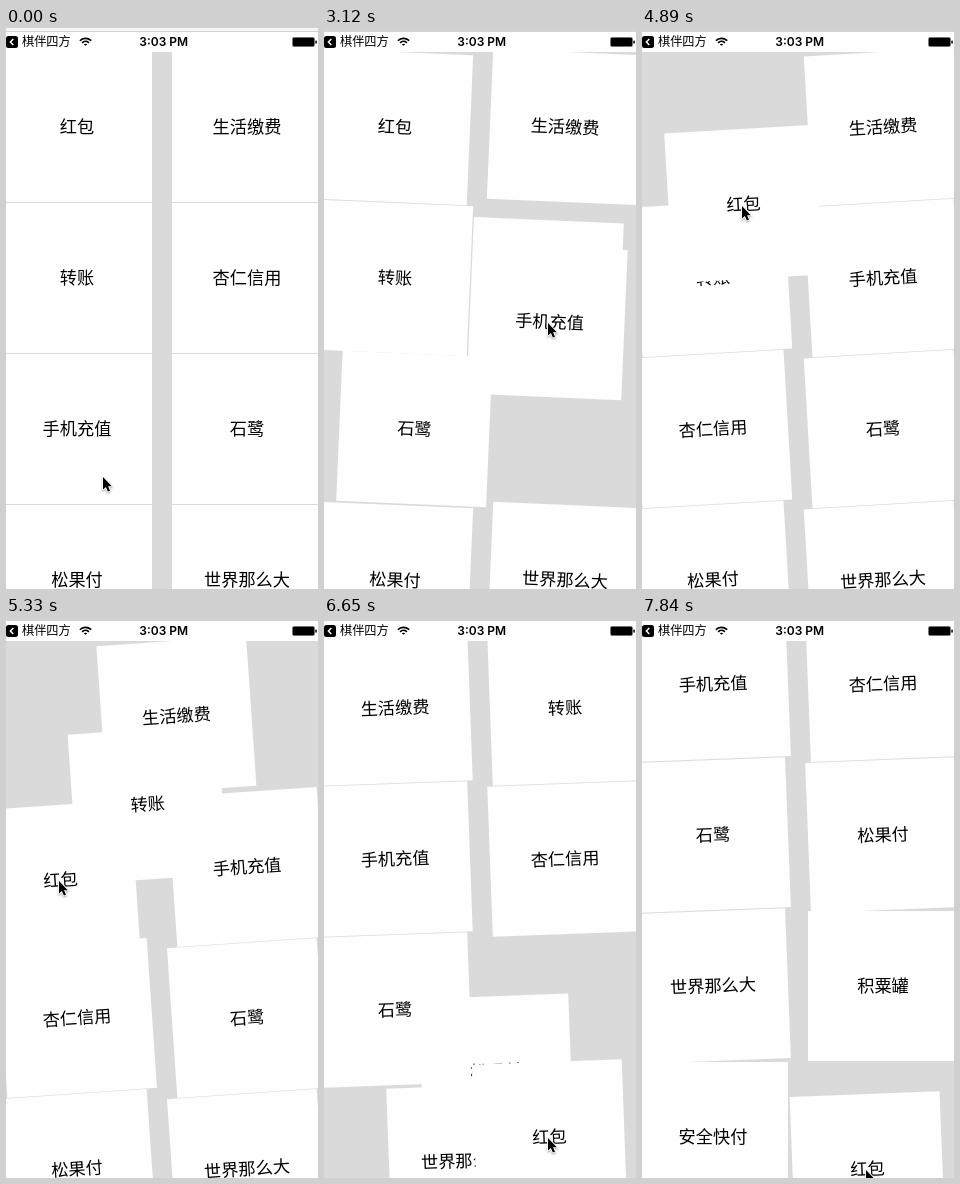
These frames come from a looping animation (312 px wide and 561 px high, 7990 ms). An HTML page with a canvas:

```html
<!DOCTYPE html>
<html lang="zh">
<head>
<meta charset="utf-8">
<title>可拖动网格</title>
<style>
html, body { margin: 0; width: 100%; height: 100%; overflow: hidden; background: #fff; }
canvas { display: block; }
</style>
</head>
<body>
<canvas id="stage" width="312" height="561"></canvas>
<script>
const W = 312, H = 561, LOOP = 7990, TICK = 148;
const WHITE = '#fefefe', GRAY = '#dadada';
const CJK = '"Noto Sans CJK SC", "Noto Sans CJK", "Noto Sans CJK JP", sans-serif';
const SIZE = 150, PITCH = 151, TOP = 24, VISIBLE = 8;
const SLIDE = 300, GRAB = 250, DROP = 220, WIGGLE = 226.5, TILT = 4 * Math.PI / 180;
const ctx = document.getElementById('stage').getContext('2d');

const labels = ['红包', '生活缴费', '转账', '杏仁信用', '手机充值', '石鹭',
  '松果付', '世界那么大', '积粟罐', '安全快付'];

// Each stop is a time and the slot the dragged cell takes over.
const drags = [
  { item: 4, start: 2067, end: 3550, stops: [[2700, 5], [3045, 3]] },
  { item: 0, start: 4648, end: LOOP + TICK, stops: [[5195, 2], [5640, 4], [6080, 5], [6491, 7], [7200, 9]] }
];

// Key points of the pointer: time, x, y.
const pointer = [
  [440, 96, 448], [1180, 79, 429], [2072, 79, 429], [2700, 165, 405], [3108, 223, 294],
  [3710, 213, 294], [3848, 136, 218], [4292, 115, 148], [4736, 115, 148], [5328, 52, 263],
  [6300, 200, 430], [6660, 223, 520], [6900, 223, 547], [7844, 223, 552]
];

const lerp = (a, b, p) => a + (b - a) * p;
const mix = (a, b, p) => a.map((v, i) => lerp(v, b[i], p));
const clamp = v => Math.max(0, Math.min(1, v));
const smooth = v => { const p = clamp(v); return p * p * (3 - 2 * p); };
const slotAt = i => [i % 2 ? 241 : 71, 99 + PITCH * (i >> 1)];

// Every cell remembers its slides from one slot to the next.
const slides = labels.map((_, i) => [{ t: -SLIDE, from: i, to: i }]);
const order = labels.map((_, i) => i);
for (const { item, stops } of drags) {
  for (const [t, slot] of stops) {
    const before = order.slice();
    order.splice(order.indexOf(item), 1);
    order.splice(slot, 0, item);
    order.forEach((id, i) => {
      const from = before.indexOf(id);
      if (from !== i) slides[id].push({ t, from, to: i });
    });
  }
}

function place(id, t) {
  const s = slides[id].filter(m => m.t <= t).pop();
  return mix(slotAt(s.from), slotAt(s.to), smooth((t - s.t) / SLIDE));
}

function pointerAt(t) {
  const i = Math.max(1, pointer.findIndex(k => k[0] > t));
  const [t0, ...a] = pointer[t < LOOP - TICK ? i - 1 : pointer.length - 2];
  const [t1, ...b] = pointer[t < LOOP - TICK ? i : pointer.length - 1];
  return mix(a, b, clamp((t - t0) / (t1 - t0)));
}

// The grabbed cell eases under the pointer and, when let go, into its slot.
function liftedAt(drag, t) {
  const [x, y] = pointerAt(t);
  const held = Math.min(smooth((t - drag.start) / GRAB), smooth((drag.end - t) / DROP));
  return mix(place(drag.item, t), [x + 2.5, y], held);
}

function wiggle(t) {
  const p = (t / WIGGLE) % 1;
  return TILT * (4 * Math.min(p, 1 - p) - 1);
}

function text(s, x, y, font, align = 'center') {
  ctx.font = font;
  ctx.textAlign = align;
  ctx.fillStyle = '#000';
  ctx.fillText(s, x, y);
}

function cell(id, [x, y], angle) {
  ctx.save();
  ctx.translate(x, y);
  ctx.rotate(angle);
  ctx.fillStyle = WHITE;
  ctx.fillRect(-SIZE / 2, -SIZE / 2, SIZE, SIZE);
  text(labels[id], 0, 6.1, '17.2px ' + CJK);
  ctx.restore();
}

function box(x, y, w, h, r, color = '#000') {
  ctx.beginPath();
  ctx.roundRect(x, y, w, h, r);
  ctx.fillStyle = color;
  ctx.fill();
}

function statusBar(t) {
  box(0, 0, W, TOP, 0, WHITE);
  box(0, 0, W, 3, 0, t < 1480 ? '#f6f6f6' : '#d2d2d2');
  box(0, 3, W, 1, 0, '#d2d2d2');

  box(0, 8, 12, 12, 2.5);
  ctx.strokeStyle = WHITE;
  ctx.lineWidth = 1.5;
  ctx.beginPath();
  ctx.moveTo(7.3, 11);
  ctx.lineTo(4.4, 14);
  ctx.lineTo(7.3, 17);
  ctx.stroke();
  text('棋伴四方', 16, 18.2, '12.2px ' + CJK, 'left');

  // wifi
  ctx.strokeStyle = '#000';
  ctx.lineWidth = 1.7;
  for (const r of [1.4, 4.6, 7.7]) {
    ctx.beginPath();
    ctx.arc(79.5, 18, r, -Math.PI * 0.76, -Math.PI * 0.24);
    ctx.stroke();
  }
  text('3:03 PM', 157.7, 18.2, '600 12px Inter, sans-serif');

  // battery
  box(286, 9, 23, 10, 2, '#999');
  box(286.8, 9.8, 21.4, 8.4, 1.2);
  box(309.3, 12.4, 1.5, 3.4, 0.7);
}

function arrow([x, y]) {
  ctx.save();
  ctx.translate(Math.round(x) + 1, Math.round(y) + 1);
  ctx.scale(0.9, 0.9);
  ctx.beginPath();
  [[0, 0], [0, 14], [3.2, 11.2], [5.4, 16.2], [7.8, 15.2], [5.6, 10.3], [9.8, 10.3]]
    .forEach(p => ctx.lineTo(...p));
  ctx.closePath();
  ctx.lineJoin = 'round';
  ctx.strokeStyle = '#fff';
  ctx.lineWidth = 2;
  ctx.shadowColor = 'rgba(0,0,0,.35)';
  ctx.shadowBlur = 2;
  ctx.shadowOffsetY = 1;
  ctx.stroke();
  ctx.shadowColor = 'transparent';
  ctx.fillStyle = '#000';
  ctx.fill();
  ctx.restore();
}

function draw(t) {
  const drag = drags.find(d => t >= d.start && t < d.end);
  const angle = drag ? wiggle(t - drag.start) : 0;
  const scroll = Math.max(0, (t - 6606) * 0.1478);
  ctx.fillStyle = GRAY;
  ctx.fillRect(0, 0, W, H);
  labels.forEach((_, id) => {
    if (drag && drag.item === id) return;
    const [x, y] = place(id, t);
    cell(id, [x, y - scroll], id < VISIBLE ? angle : 0);
  });
  if (drag) cell(drag.item, liftedAt(drag, t), angle);
  statusBar(t);
  arrow(pointerAt(t));
}

// The screen is sampled in even ticks, so the picture steps rather than glides.
function loop() {
  const t = performance.now() % LOOP;
  draw(Math.min(53, Math.floor((t + 15) / TICK)) * TICK);
  requestAnimationFrame(loop);
}
loop();
</script>
</body>
</html>
```
